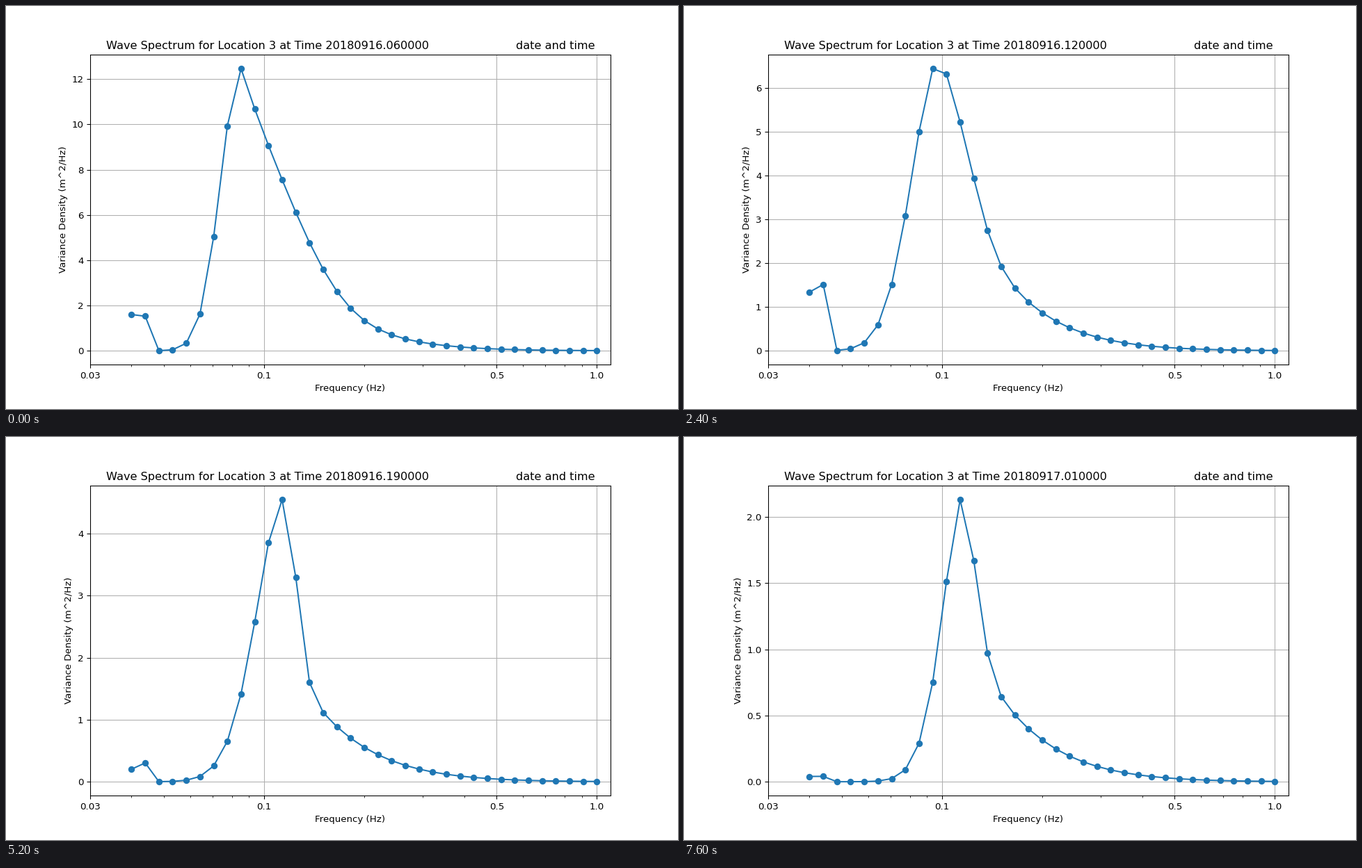
A matplotlib script for the animation above (8 s loop, 966 px wide and 580 px high).

```python
import numpy as np
import matplotlib.pyplot as plt
from matplotlib.animation import FuncAnimation

WIDTH, HEIGHT, DPI = 966, 580, 96
FRAMES, INTERVAL = 20, 400
FIRST_HOUR, FIRST_DATE = 6, 20180916

plt.rcParams.update({
    "font.family": "DejaVu Sans",
    "font.size": 10.0625,
    "lines.markersize": 6.04,
    "lines.linewidth": 1.51,
})

bins = np.arange(35)
freqs = np.geomspace(0.04, 1.0, len(bins))

# How the storm develops; values between the key hours are interpolated.
KEY_HOURS = [6, 10, 12, 15, 19, 22, 25]
PEAK = [12.465, 9.173, 6.441, 5.277, 4.546, 3.59, 2.13]
CENTRE = [8, 9.5, 9.6, 10.5, 11, 11, 11]
RISE_WIDTH = [2.1, 2.83, 2.95, 3.15, 2.75, 2.1, 1.95]
CORE_WIDTH = [6, 3.6, 3, 1.65, 1.4, 1.5, 1.65]
TAIL_SHARE = [0.73, 0.5, 0.7, 0.57, 0.47, 0.47, 0.57]


def wind_sea(hour):
    """Steep rise to the peak, then a rounded core on top of a long tail."""
    peak, centre, rise_width, core_width, share = (
        np.interp(hour, KEY_HOURS, values)
        for values in (PEAK, CENTRE, RISE_WIDTH, CORE_WIDTH, TAIL_SHARE))
    power = np.interp(hour, [15, 22], [2, 1.6])
    dist = np.abs(bins - centre)
    rise = np.exp(-(dist / rise_width) ** power)
    core = np.exp(-(dist / core_width) ** 2.5)
    tail = np.exp(-0.21 * dist - 0.0025 * dist ** 2)
    shape = np.where(bins < centre, rise, share * tail + (1 - share) * core)
    return peak * shape / shape.max()


def swell(hour):
    """Energy in the two lowest bins."""
    first = np.exp(np.interp(hour, [6, 10, 25], np.log([1.6, 2.3, 0.04])))
    ratio = 0.95 + 0.6 * np.exp(-((hour - 17.5) / 5) ** 2)
    return first, first * ratio


def density(hour):
    values = wind_sea(hour)
    values[:2] = swell(hour)
    return values


fig, ax = plt.subplots(figsize=(WIDTH / DPI, HEIGHT / DPI), dpi=DPI)
fig.subplots_adjust(left=0.1249, right=0.8999, bottom=0.1096, top=0.8796)
line, = ax.plot(freqs, density(FIRST_HOUR), marker="o", color="C0")
ax.set_xscale("log")
ax.set_xticks([0.03, 0.1, 0.5, 1.0], labels=["0.03", "0.1", "0.5", "1.0"])
ax.tick_params(axis="x", which="minor", labelbottom=False)
ax.set_xlim(0.03, 1.1)
ax.set_xlabel("Frequency (Hz)")
ax.set_ylabel("Variance Density (m^2/Hz)")
ax.set_title("date and time", loc="right", x=0.9701)
ax.grid(True)


def update(frame):
    hour = FIRST_HOUR + frame
    values = density(hour)
    line.set_ydata(values)
    ax.set_ylim(-0.05 * values.max(), 1.05 * values.max())
    stamp = f"{FIRST_DATE + hour // 24}.{hour % 24:02d}0000"
    ax.set_title(f"Wave Spectrum for Location 3 at Time {stamp}",
                 loc="left", x=0.0307)
    return line,


anim = FuncAnimation(fig, update, frames=FRAMES, interval=INTERVAL,
                     repeat=True, repeat_delay=0)
plt.show()
```
